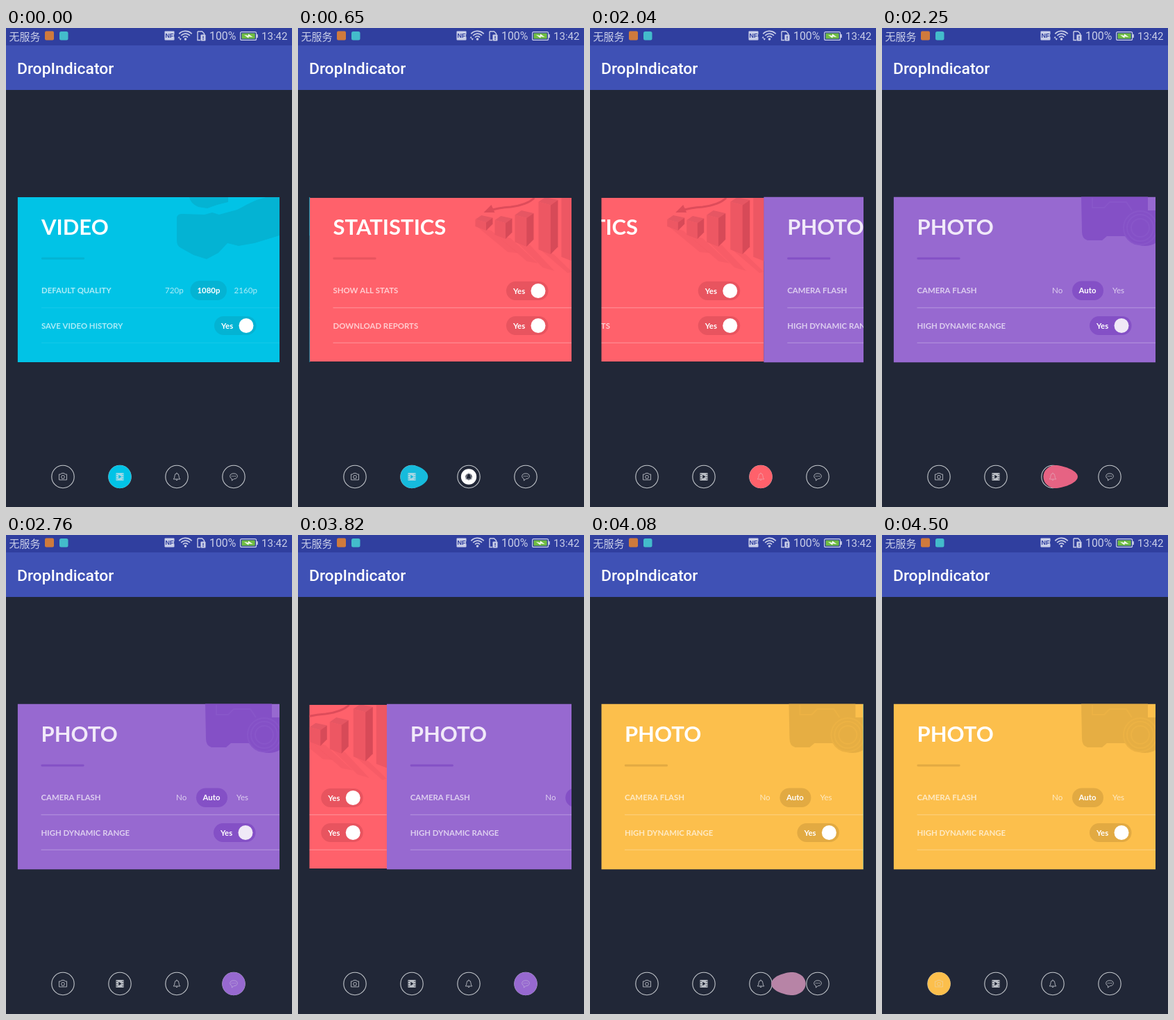
An HTML page with a canvas for the animation above (5.67 s loop, 412x688 px).

```html
<!DOCTYPE html>
<html lang="en">
<head>
<meta charset="utf-8">
<title>DropIndicator</title>
<style>
html, body { margin: 0; width: 100%; height: 100%; overflow: hidden; background: #212737; }
canvas { display: block; }
</style>
</head>
<body>
<canvas id="stage" width="412" height="688"></canvas>
<script>
const ctx = document.getElementById('stage').getContext('2d');
const LOOP = 5670, LEFT = 16.5, PAGE_W = 377.5, R = 16.5, DROP_MS = 700;
const ICON_Y = 644.5, ICON_GREY = '#b9bdc4';

const pages = [
  { bg: '#fcbf4c', accent: '#e2aa42', line: 0.2, top: 242.5, bottom: 480.5, draw: photo },
  { bg: '#01c3e6', accent: '#04b3d3', line: 0.06, top: 243, bottom: 480, draw: video },
  { bg: '#ff616b', accent: '#e8545f', line: 0.22, top: 244, bottom: 479, draw: statistics },
  { bg: '#9769d0', accent: '#8450c6', line: 0.2, top: 242.5, bottom: 480.5, draw: photo }
];

// start: motion origin; show: first visible change; ms: page scroll time
const moves = [
  { start: 522, show: 530, from: 1, to: 2, ms: 175 },
  { start: 2025, show: 2040, from: 2, to: 3, ms: 175 },
  { start: 3814, show: 3820, from: 3, to: 0, ms: 342 }
];

const clamp = (v, lo = 0, hi = 1) => Math.min(hi, Math.max(lo, v));
const iconX = i => 82 + 82 * i;

function text(str, x, y, size, color, weight = 700, family = 'Lato') {
  ctx.font = `${weight} ${size}px ${family}, sans-serif`;
  ctx.fillStyle = color;
  ctx.fillText(str, x, y);
}

function box(x, y, w, h, r, color) {
  ctx.fillStyle = color;
  ctx.beginPath();
  ctx.roundRect(x, y, w, h, r);
  ctx.fill();
}

function disc(x, y, r, color) {
  ctx.fillStyle = color;
  ctx.beginPath();
  ctx.arc(x, y, r, 0, Math.PI * 2);
  ctx.fill();
}

function poly(points, color) {
  ctx.fillStyle = color;
  ctx.beginPath();
  for (let i = 0; i < points.length; i += 2) ctx.lineTo(points[i], points[i + 1]);
  ctx.closePath();
  ctx.fill();
}

function shape(d, color) {
  ctx.fillStyle = color;
  ctx.fill(new Path2D(d));
}

function stroke(d, color, width) {
  ctx.strokeStyle = color;
  ctx.lineWidth = width;
  ctx.stroke(new Path2D(d));
}

// ---- pages ----
const SOFT = 'rgba(255,255,255,0.68)';

function heading(title, first, second, x, p) {
  text(title, x, 296.5, 31, p === pages[3] ? '#f1e9f9' : '#fff');
  box(x, 329.5, 62, 3, 1, p.accent);
  text(first, x, 381, 11.4, SOFT);
  text(second, x, 431.5, 11.4, SOFT);
  ctx.fillStyle = `rgba(255,255,255,${p.line})`;
  ctx.fillRect(x, 401, 394 - x, 1.5);
  ctx.fillRect(x, 451.5, 394 - x, 1.5);
}

function toggle(x, y, p) {
  box(x, y - 13.5, 60.5, 27, 13.5, p.accent);
  text('Yes', x + 10, y + 4, 11.4, '#fff');
  disc(x + 46, y, 10.5, p === pages[3] ? '#f0e9f7' : '#fff');
}

function photo(p) {
  ctx.globalAlpha = p === pages[0] ? 0.8 : 1;
  shape('M287 242H383V262H394V309Q384 315 370 312Q357 311 350 299H324L317 305H296Q288 303 288 292Z', p.accent);
  ctx.globalAlpha = 1;
  ctx.strokeStyle = p.bg;
  ctx.lineWidth = 2;
  ctx.globalAlpha = 0.22;
  for (const r of [13, 19, 24]) {
    ctx.beginPath();
    ctx.arc(372, 287, r, 0, Math.PI * 2);
    ctx.stroke();
  }
  stroke('M303 244V258H320L328 250H352L360 262', p.bg, 2);
  ctx.globalAlpha = 1;
  heading('PHOTO', 'CAMERA FLASH', 'HIGH DYNAMIC RANGE', 50.5, p);
  box(274, 363.5, 45, 27.5, 13.7, p.accent);
  text('No', 245, 381, 11.6, SOFT, 400);
  text('Auto', 283.5, 381, 11.4, '#fff');
  text('Yes', 332, 381, 11.6, SOFT, 400);
  toggle(299, 427.5, p);
}

function video(p) {
  shape('M264 242Q265 252 277 257L290 259L304 254L320 250L320 242Z', p.accent);
  shape('M246 272Q247 267 254 267L286 268L297 265L307 268L333 261L350 252L361 247L378 242H394V298L358 309L335 313L319 309L306 323L289 332L270 326L252 316Q246 313 246 305Z', p.accent);
  heading('VIDEO', 'DEFAULT QUALITY', 'SAVE VIDEO HISTORY', 51, p);
  box(265.5, 363, 52.5, 28, 14, p.accent);
  text('720p', 229, 381, 11.6, SOFT, 400);
  text('1080p', 275.5, 381, 11.4, '#fff');
  text('2160p', 328.5, 381, 11.6, SOFT, 400);
  toggle(300, 427.5, p);
}

function bar(x, y, w, h) {
  const m = x + w * 0.62, lip = w * 0.24;
  poly([x, y + lip, x + w * 0.35, y, x + w, y + lip * 0.6, m, y + lip * 1.7], '#e65663');
  poly([x, y + lip, m, y + lip * 1.7, m, y + h, x, y + h - lip], '#ed5763');
  poly([m, y + lip * 1.7, x + w, y + lip * 0.6, x + w, y + h - lip * 1.6, m, y + h], '#d74a58');
}

function statistics(p) {
  ctx.globalAlpha = 0.35;
  poly([257, 285, 278, 291, 316, 323, 302, 322], p.accent);
  poly([285, 297, 306, 302, 345, 338, 329, 335], p.accent);
  poly([314, 307, 334, 312, 369, 349, 352, 344], p.accent);
  poly([347, 317, 368, 325, 394, 350, 388, 352], p.accent);
  ctx.globalAlpha = 1;
  bar(255, 269, 25, 22);
  bar(283, 270, 25, 33);
  bar(312, 262, 27, 52);
  bar(346, 243, 28, 82);
  bar(379, 222, 30, 114);
  stroke('M340 244Q330 254 306 257Q288 258 273 263', '#de4c5a', 3);
  poly([267, 265, 278, 254, 283, 265], '#de4c5a');
  heading('STATISTICS', 'SHOW ALL STATS', 'DOWNLOAD REPORTS', 50, p);
  toggle(299.5, 377.5, p);
  toggle(299.5, 427.5, p);
}

function drawPages(pos) {
  ctx.save();
  ctx.beginPath();
  ctx.rect(LEFT, 242, PAGE_W, 239);
  ctx.clip();
  pages.forEach((p, i) => {
    const dx = (i - pos) * PAGE_W;
    if (Math.abs(dx) >= PAGE_W) return;
    ctx.save();
    ctx.translate(dx, 0);
    ctx.beginPath();
    ctx.rect(LEFT, p.top, PAGE_W + 0.5, p.bottom - p.top);
    ctx.clip();
    ctx.fillStyle = p.bg;
    ctx.fillRect(LEFT, p.top, PAGE_W + 0.5, p.bottom - p.top);
    p.draw(p);
    ctx.restore();
  });
  ctx.restore();
}

// ---- indicator ----
const icons = [
  c => {
    stroke('M-5.5 -3.5H-3L-2 -5H2L3 -3.5H5.5V4.5H-5.5Z', c, 0.9);
    stroke('M2.4 .4A2.4 2.4 0 1 1 -2.4 .4A2.4 2.4 0 1 1 2.4 .4', c, 0.9);
  },
  c => {
    let d = 'M-5.5 -5.5H5.5V5.5H-5.5ZM-1.8 -2.8V2.8L2.6 0Z';
    for (const x of [-4.7, 3.5]) for (const y of [-4, -0.6, 2.8]) d += `M${x} ${y}h1.2v1.2h-1.2Z`;
    ctx.fillStyle = c;
    ctx.fill(new Path2D(d), 'evenodd');
  },
  c => {
    stroke('M-4.8 3.5Q-3 2 -3 -1Q-3 -4.6 0 -4.6Q3 -4.6 3 -1Q3 2 4.8 3.5Z', c, 0.9);
    stroke('M0 -4.6V-6M-1.4 4.2Q0 6.6 1.4 4.2', c, 0.9);
  },
  c => {
    stroke('M-2.5 3.1Q-5.3 2 -5.3 -.8Q-5 -4.6 0 -4.6Q5 -4.6 5.3 -.8Q5 3 .4 3.2L-2.6 5.6Z', c, 0.9);
    for (const x of [-2.3, 0, 2.3]) disc(x, -0.7, 0.7, c);
  }
];

function mix(a, b, k) {
  const ch = (s, i) => parseInt(s.slice(i, i + 2), 16);
  return `rgb(${[1, 3, 5].map(i => Math.round(ch(a, i) + (ch(b, i) - ch(a, i)) * k)).join()})`;
}

// Elastic circle: front stretches, body follows, tail catches up and bounces
function drop(from, to, p) {
  const dir = Math.sign(to - from) || 1;
  const part = (a, len) => clamp((p - a) / len);
  const s1 = part(0, 0.2), s2 = part(0.2, 0.3), s3 = part(0.5, 0.3), s4 = part(0.8, 0.1), s5 = part(0.9, 0.1);
  const k = R * 0.552, h = k * (1 + 0.45 * (s2 - s3));
  const front = R + R * s1, mid = R / 2 * (s2 + s3);
  const tail = -R + R / 2 * (s3 + s4) + Math.sin(Math.PI * s5) * 0.2 * R;
  const shift = (Math.abs(to - from) * 82 - R) * part(0.2, 0.8);
  ctx.save();
  ctx.translate(iconX(from) + dir * shift, ICON_Y);
  ctx.scale(dir, 1);
  ctx.beginPath();
  ctx.moveTo(mid, -R);
  ctx.bezierCurveTo(mid + k, -R, front, -h, front, 0);
  ctx.bezierCurveTo(front, h, mid + k, R, mid, R);
  ctx.bezierCurveTo(mid - k, R, tail, h, tail, 0);
  ctx.bezierCurveTo(tail, -h, mid - k, -R, mid, -R);
  ctx.fillStyle = mix(pages[from].bg, pages[to].bg, p);
  ctx.fill();
  ctx.restore();
  return iconX(from) + dir * (shift + mid);
}

function pulse(i, age) {
  const outer = clamp((age - 31) * 0.114, 0, 16), hole = clamp((age - 110) * 0.25, 0, 16);
  if (outer <= hole) return;
  ctx.beginPath();
  ctx.arc(iconX(i), ICON_Y, outer, 0, Math.PI * 2);
  ctx.arc(iconX(i), ICON_Y, hole, 0, Math.PI * 2, true);
  ctx.fillStyle = '#fff';
  ctx.fill();
}

function drawIndicator(m, t) {
  for (let i = 0; i < 4; i++) {
    ctx.beginPath();
    ctx.arc(iconX(i), ICON_Y, 16.2, 0, Math.PI * 2);
    ctx.strokeStyle = '#c3c7cc';
    ctx.lineWidth = 1.1;
    ctx.stroke();
  }
  const linear = m ? clamp((t - m.start) / DROP_MS) : 0;
  const eased = 0.5 - Math.cos(Math.PI * linear) / 2;
  if (m) pulse(m.to, t - m.start);
  const x = drop(m ? m.from : 1, m ? m.to : 1, eased);
  icons.forEach((icon, i) => {
    const covered = Math.abs(x - iconX(i)) < R;
    ctx.save();
    ctx.translate(iconX(i), ICON_Y);
    icon(covered ? `rgba(225,225,230,${i === 1 ? 0.7 : 0.42})` : ICON_GREY);
    ctx.restore();
  });
}

// ---- system bars ----
function drawBars(t) {
  const c = '#c9cee8';
  ctx.fillStyle = '#303f9f';
  ctx.fillRect(0, 0, 412, 25);
  ctx.fillStyle = '#3f51b5';
  ctx.fillRect(0, 25, 412, 64);
  text('DropIndicator', 16, 66, 22.9, '#fff', 500, 'Roboto');
  text('无服务', 4.5, 17.5, 15, c, 400, '"Noto Sans CJK SC", "Noto Sans CJK"');
  box(56, 4.5, 13, 13, 2, '#cf7a3c');
  box(77, 5, 12.5, 12.5, 2.5, '#43bccb');

  box(228.5, 4.5, 14, 13, 1, c);
  text('NFC', 229.6, 14.4, 9, '#303f9f', 700, '"Liberation Sans Narrow", "Liberation Sans"'.slice(26));

  ctx.strokeStyle = c;
  ctx.lineWidth = 1.7;
  for (const r of [4.6, 8.4, 12.2]) {
    ctx.beginPath();
    ctx.arc(258.5, 16.5, r, -Math.PI * 0.77, -Math.PI * 0.23);
    ctx.stroke();
  }
  disc(258.5, 16, 1.8, c);
  if (t < 2680) {
    poly([247.5, 14.5, 249.2, 12, 251, 14.5], c);
    poly([249.5, 15, 253, 15, 251.2, 17.8], c);
  }

  stroke('M276 5H282.5L285.5 8V10M276 5V17.5H280', c, 1.4);
  box(280.5, 9.5, 7, 9, 1, c);
  box(283.3, 11.5, 1.4, 3.2, 0, '#303f9f');
  box(283.3, 15.6, 1.4, 1.4, 0, '#303f9f');

  text('100%', 293, 17, 15.9, c, 400, 'Roboto');
  ctx.beginPath();
  ctx.roundRect(337.6, 5.6, 23, 11.8, 2);
  ctx.strokeStyle = c;
  ctx.lineWidth = 1.2;
  ctx.stroke();
  box(339.5, 7.5, 19.2, 8, 0.5, '#70bd43');
  box(361, 9, 1.8, 5, 0.5, c);
  poly([343, 10, 349, 11, 349, 8.5, 355.5, 13, 349.5, 12.3, 349.3, 14.6], '#fff');
  text('13:42', 368, 17, 15.1, c, 400, 'Roboto');
}

function frame(now) {
  const t = now % LOOP;
  const m = moves.filter(s => t >= s.show).pop();
  const left = m ? 1 - clamp((t - m.start) / m.ms) : 1;
  const pos = m ? m.to + (m.from - m.to) * left ** 5 : 1;
  ctx.fillStyle = '#212737';
  ctx.fillRect(0, 0, 412, 688);
  drawBars(t);
  drawPages(pos);
  drawIndicator(m, t);
}

const t0 = performance.now();
function tick() {
  frame(performance.now() - t0);
  requestAnimationFrame(tick);
}
tick();
</script>
</body>
</html>
```
